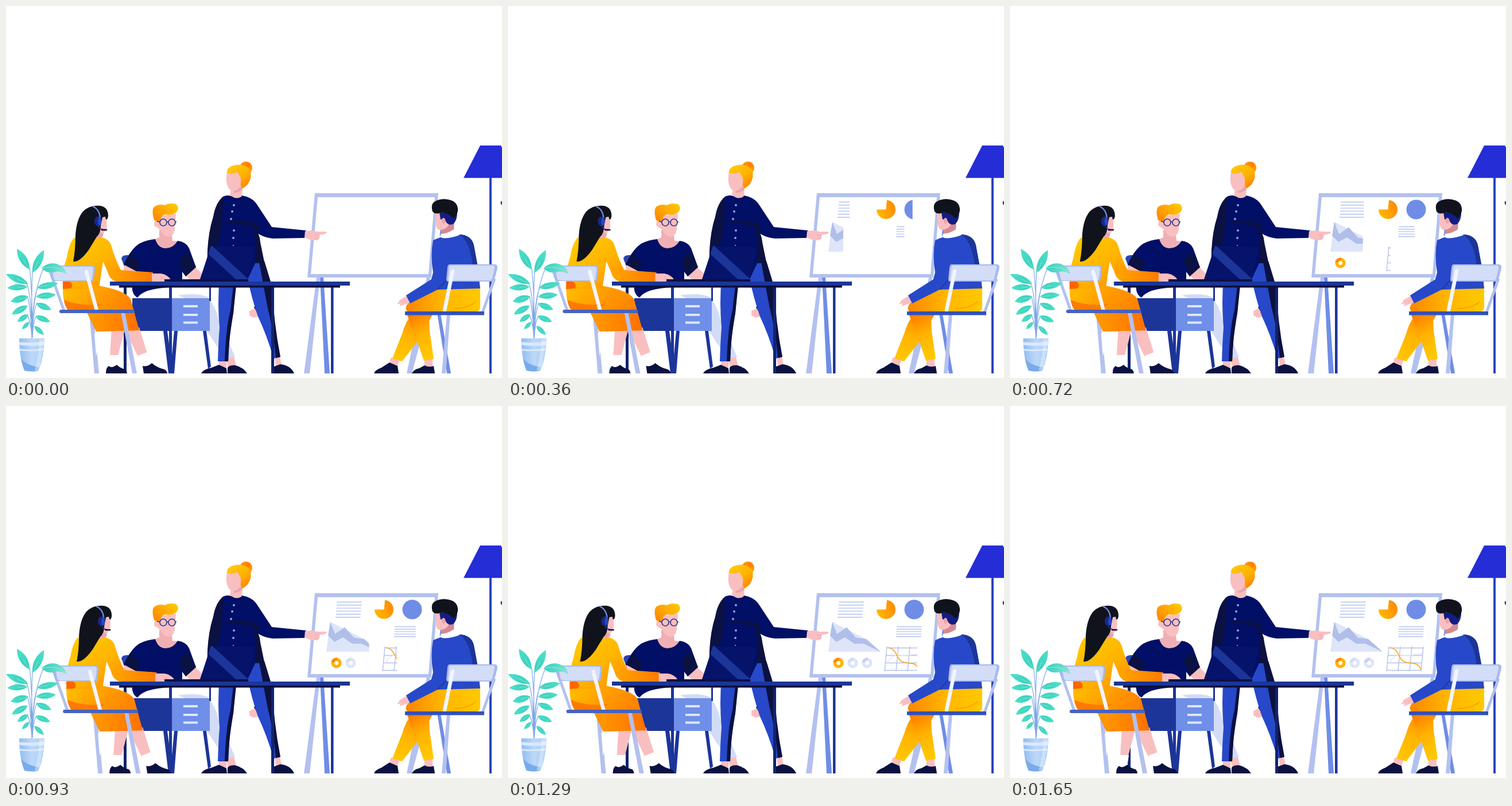
Write an HTML page with a canvas that moves like this. It is 864 px wide and 648 px high and loops after 1.8 s.

```html
<!DOCTYPE html>
<html lang="en">
<head>
<meta charset="utf-8">
<title>Meeting</title>
<style>
html, body { margin: 0; width: 100%; height: 100%; overflow: hidden; background: #fff; }
canvas { display: block; width: 864px; height: 648px; }
</style>
</head>
<body>
<canvas id="stage" width="864" height="648"></canvas>
<script>
const ctx = document.getElementById('stage').getContext('2d');
const LOOP = 1800, STEP = 30, LAST = 1650;
const NAVY = '#020f66', INK = '#0b1140', DEEP = '#1c3598', BLUE = '#2748c8', SKY = '#6f8de6';
const PALE = '#b3c1ef', MIST = '#dfe5f8', SKIN = '#f9bfc0', BLUSH = '#e8a5ac', HAIR = '#10131c';

function grad(x0, y0, x1, y1, ...cols) {
  const g = ctx.createLinearGradient(x0, y0, x1, y1);
  cols.forEach((c, i) => g.addColorStop(i / (cols.length - 1), c));
  return g;
}
function shape(d, fill) {
  ctx.fillStyle = fill;
  ctx.fill(new Path2D(d));
}
function line(d, stroke, w = 1.5, cap = 'butt') {
  ctx.strokeStyle = stroke;
  ctx.lineWidth = w;
  ctx.lineCap = cap;
  ctx.stroke(new Path2D(d));
}
function rect(x, y, w, h, fill) {
  ctx.fillStyle = fill;
  ctx.fillRect(x, y, w, h);
}
function oval(x, y, rx, ry, fill) {
  ctx.beginPath();
  ctx.ellipse(x, y, rx, ry, 0, 0, 7);
  ctx.fillStyle = fill;
  ctx.fill();
}
// Shows only what lies left of the moving edge.
function wipe(edge, draw) {
  ctx.save();
  ctx.beginPath();
  ctx.rect(0, 0, Math.max(0, edge), 648);
  ctx.clip();
  draw();
  ctx.restore();
}

function leaf(x0, y0, x1, y1, w) {
  const mx = (x0 + x1) / 2, my = (y0 + y1) / 2, len = Math.hypot(x1 - x0, y1 - y0);
  const nx = (y0 - y1) / len * w, ny = (x1 - x0) / len * w;
  shape(`M${x0} ${y0}Q${mx + nx} ${my + ny} ${x1} ${y1}Q${mx - nx} ${my - ny} ${x0} ${y0}`,
    grad(x0, y0, x1, y1, '#35cdbd', '#4fe0c8'));
  line(`M${x0} ${y0}L${mx} ${my}`, '#a9eee4', .7);
}
function plant() {
  const leaves = [
    [41, 459, 19, 423, 13], [46, 465, 66, 425, 13], [39, 484, 0, 467, 12], [38, 489, 2, 491, 11],
    [39, 506, 8, 515, 12], [38, 522, 10, 537, 11], [39, 537, 20, 550, 9], [41, 550, 28, 563, 7],
    [53, 491, 91, 483, 11], [52, 506, 87, 503, 11], [52, 518, 79, 529, 11],
    [51, 540, 77, 550, 10], [49, 557, 66, 573, 8]
  ];
  line('M45 580Q47 510 41 455M45 580Q44 510 46 462M45 580Q46 500 66 455M44 545Q43 500 36 483' +
    'M46 545Q49 505 55 491M44 560Q42 520 37 505M46 565Q49 525 54 517M45 575Q44 555 37 537M46 578Q47 550 53 540', '#7fa8e8', 1.2);
  leaves.forEach(l => leaf(...l));
  shape('M62 457Q72 446 88 449Q103 454 105 467Q93 460 83 464Q71 466 62 457', grad(62, 450, 105, 466, '#35cdbd', '#7fe6d5'));
  line('M62 457Q85 451 102 463', '#a9eee4', .8);
  const pot = 'M23 579H67Q66 612 57 635Q45 638 32 635Q23 612 23 579Z';
  shape(pot, grad(23, 0, 67, 0, '#8fbcf0', '#bcd8f8', '#a8cbf5'));
  ctx.save();
  ctx.clip(new Path2D(pot));
  shape('M20 585Q45 588 70 584V590Q45 594 20 590ZM20 597Q45 600 70 596V599Q45 603 20 600Z', '#d9e8fc');
  shape('M20 603Q28 625 57 629L55 640H20Z', '#79abea');
  shape('M58 580H67L58 635H50Q57 610 58 580Z', 'rgba(235,244,255,.45)');
  ctx.restore();
}

function lamp() {
  rect(842, 299, 4, 341, '#2a45bd');
  shape('M826 243H862L866 250V299.5H797Z', '#252dd6');
  oval(865, 343, 3.5, 3.5, '#2c3fb0');
}

function board() {
  shape('M541 473H547L529 640H519ZM733 473H739L707 640H698Z', PALE);
  shape('M547 473H553L564 640H555ZM741 473H746L775 640H768Z', SKY);
  line('M750 335Q762 380 757 400', SKY, 3.5);
  shape('M538 326H753L741 473H525Z', PALE);
  shape('M543 333H747L736 467H531Z', '#fff');
}
function textLines(x, y, w, gap, n, lean) {
  for (let i = 0; i < n; i++) {
    const l = x - lean * i / (n - 1);
    line(`M${l} ${y + gap * i}h${w}`, PALE, 1.4);
  }
}
function donut(x, base, part) {
  const y = 447.5;
  ctx.lineWidth = 5.6;
  ctx.lineCap = 'butt';
  [[0, 6.2832, base], [3.3, 4.9, part]].forEach(([a, b, c]) => {
    ctx.beginPath();
    ctx.arc(x, y, 6.3, a, b);
    ctx.strokeStyle = c;
    ctx.stroke();
  });
}
function charts(t) {
  wipe(574 + .0588 * t, () => textLines(576.5, 341.5, 43.5, 5.3, 6, 2.5));
  wipe(642 + .19 * (t - 30), () => {
    shape('M658.5 354.5L660 338A16.5 16.5 0 1 1 642 354.5Z', grad(642, 360, 675, 345, '#ffb900', '#ff8700'));
    oval(707.5, 354.5, 17, 17, SKY);
  });
  wipe(677 + .041 * (t - 35), () => textLines(677.5, 384.5, 43.5, 4.3, 5, 1.5));
  wipe(558 + .085 * (t - 54), () => {
    shape('M565 376L558 428H649L624 406Z', MIST);
    shape('M565 376L573 397L590 385.5L606 403.5L624 406L649 428L619 414H603L587 403L572 411L561 400Z', '#b0bfe9');
  });
  wipe(567 + .12 * (t - 545), () => {
    donut(575.5, '#ffb300', '#ff8a00');
    donut(600.5, MIST, '#d3dcf6');
    donut(625.5, MIST, '#c6d1f2');
  });
  wipe(655 + .088 * (t - 630), () => {
    for (let i = 0; i < 4; i++) {
      line(`M${660 + 20 * i} 419l-4 43`, PALE, 1.4);
      line(`M${659 - i} ${421.5 + 13 * i}h61`, PALE, 1.4);
    }
    line('M657 451C667 438 672 433 682 434S704 434 718 431', MIST, 1.4);
    line('M662 421C678 423 675 439 686 445S709 443 716 459', '#ffa91f', 1.7);
  });
}

function sitter() {
  shape('M201 440Q202 434 210 434H222V456H207Z', '#2a45b0');
  shape('M274 566H281L291 640H283ZM293 566H299L293 640H286ZM343 566H349L357 628L352 632Z', DEEP);
  shape('M300 504Q335 499 351 507Q364 521 370 545L399 611L383 616L350 566L335 520Z', '#d3dcf6');
  shape('M384 614L397 611L401 628L387 630Z', SKIN);
  shape('M386 640V630Q390 625 400 626Q414 630 420 640Z', INK);
  shape('M207 451L229 460L218 481H203Q202 465 207 451ZM313 470L331 456L345 470L340 477H322Z', SKIN);
  shape('M267 390H288L290 409L300 410Q288 425 273 424Q260 420 258 407L267 403Z', '#eeb0b5');
  shape('M265 366L296 362L294 389Q292 401 284 402Q275 402 269 390L258 382Q258 371 265 371Z', SKIN);
  shape('M258 373Q253 356 258 350Q266 344 277 347Q284 342 296 345Q303 351 297 359Q291 365 278 363Q270 364 269 373L265 376Z',
    grad(260, 372, 290, 345, '#ff8a00', '#ffc400'));
  line('M268 377a6 6 0 1 0 12 0a6 6 0 1 0 -12 0M283 377a6 6 0 1 0 12 0a6 6 0 1 0 -12 0M280 376h3M263 375l5 1M295 376h2', '#24358c', 1.6);
  shape('M260 406Q265 422 278 422Q291 422 299 409Q314 411 319 422L331 455L313 471L307 463V482H287L286 490Q240 492 229 508Q218 502 220 485L229 463L205 450Q217 424 232 414Q246 407 260 406Z', NAVY);
  shape('M205 450L217 431L234 449L229 463ZM302 443L317 428L331 455L313 471Z', INK);
}

function cabinet() {
  rect(220, 509, 70, 57, DEEP);
  rect(289, 509, 66, 57, '#6f8fe8');
  [521, 536, 549.5].forEach(y => rect(309, y, 25, 4, MIST));
  rect(354, 490, 3, 24, DEEP);
}

function speaker() {
  shape('M424 531L433 527L441 532L440 541L431 543L424 539Z', SKIN);
  shape('M432 525L437 518L442 530L438 534Z', INK);
  shape('M371 614H385L384 630H371ZM468 610L477 609L480 627L470 629Z', SKIN);
  shape('M340 640Q343 633 358 630L371 625L384 631L385 640ZM467 640V628L478 624Q496 626 502 640Z', INK);
  shape('M372 470H401L396 535L389 580L387 619H369Q370 585 372 560Q368 520 372 470Z', BLUE);
  shape('M401 487L396 535Q389 570 387 619H381Q383 560 391 530L396 487Z', INK);
  shape('M425 448H450L462 520L477 612L466 614Q455 575 439 541Q428 510 421 475Z', BLUE);
  shape('M441 446L450 444L464 490Q466 550 478 611L470 613Q465 560 456 527Q449 490 441 446Z', INK);
  // far sleeve, then the jacket
  shape('M378 332Q365 343 361 367Q353 391 351 425L350 480H418L428 448H450Q443 425 442 404L432 380L380 372Z', INK);
  shape('M378 332Q388 327 398 334L411 330Q428 333 436 344L463 385L523 391L520 404L465 405Q443 402 436 393L437 407L434 448L420 478H366L368 418L375 390L377 362Z', NAVY);
  shape('M384 374Q405 378 417 374L436 381L441 402L450 446H437L434 400L430 383Q405 379 384 378Z', INK);
  line('M429 364L440 390', INK, 1);
  [[397, 347], [394, 358], [392, 371], [397, 391], [396, 404]].forEach(([x, y]) => oval(x, y, 2, 2, '#8ba1e8'));
  oval(396, 417, 1.1, 1.1, '#8ba1e8');
  shape('M393 312L413 306L411 331Q406 336 398 334L390 329Z', SKIN);
  shape('M397 322L411 313V320Q405 326 396 325Z', BLUSH);
  oval(418, 282, 11, 11, grad(408, 272, 428, 292, '#ff9a00', '#ff7f00', '#ffae00'));
  shape('M385 294Q383 281 396 278Q414 273 425 285Q430 297 421 311L412 318L400 296Z',
    grad(395, 278, 420, 316, '#ffc800', '#ffb300', '#ff8200'));
  shape('M385 290Q393 295 403 289L409 300Q411 321 396 322Q388 322 385 311Q382 301 385 290Z', SKIN);
  line('M400 290Q393 287 397 291', BLUSH, 1);
  shape('M521 392L532 391L544 393L557 393Q561 395 556 397L546 399Q548 405 542 408H532L520 403Z', SKIN);
  line('M546 399H537M545 404H539', BLUSH, 1);
}

function laptop() {
  const lid = 'M357 418L434 420L420 479H337Z';
  shape(lid, '#06136a');
  ctx.save();
  ctx.clip(new Path2D(lid));
  line('M346 416L420 484', DEEP, 15);
  ctx.restore();
  rect(276, 476, 146, 4.5, INK);
}

function tableLegs() {
  rect(205, 488, 5, 152, '#12236f');
  rect(284, 488, 5, 152, DEEP);
  rect(462, 488, 5, 152, '#12236f');
  rect(566, 488, 4.5, 152, DEEP);
}
function tableTop() {
  rect(197, 486, 385, 4.5, '#0a1038');
  rect(181, 480, 418, 7, DEEP);
}

function caller() {
  // chair legs, shins and shoes
  shape('M145 534H152L162 640H154Z', PALE);
  shape('M184 560H208L195 609H181ZM205 560H232L246 605L230 611Z', SKIN);
  shape('M181 608H196L193 629H180ZM230 609L246 603L254 624L238 630Z', '#fff');
  shape('M174 640Q174 630 179 627Q184 632 193 625Q199 631 208 633Q211 636 211 640ZM240 640L238 627Q247 629 254 622Q263 630 276 633Q281 636 281 640Z', INK);
  shape('M100 480L160 487Q207 495 217 510L232 565L157 567L141 534L108 530Q96 512 100 480Z',
    grad(115, 485, 200, 565, '#ffbc00', '#ff9600', '#ff7a00'));
  shape('M101 512Q130 524 168 519Q154 526 160 531H109Q102 523 101 512Z', '#ff7a00');
  shape('M145 534L222 533L232 565L157 567Z', grad(150, 0, 230, 0, '#ff9800', '#ff7000'));
  shape('M118 404Q140 398 162 402Q178 404 183 416Q190 441 200 460L256 464V480L199 481Q181 480 177 463L169 445L162 492L99 494Q97 463 106 437Q109 416 118 404Z',
    grad(120, 405, 190, 490, '#ffc800', '#ffb600', '#ff8f00'));
  shape('M183 454Q189 462 200 462L256 464V480L199 481Q185 480 180 470Z', grad(183, 0, 256, 0, '#ffa300', '#ff7a00'));
  shape('M99 480H111Q119 486 113 492L99 493Z', '#ff6400');
  shape('M254 466L270 466Q280 468 286 475L285 480H254Z', SKIN);
  line('M270 473L282 478', BLUSH, 1);
  // head
  shape('M156 388H171L169 401Q163 407 153 404Z', BLUSH);
  shape('M163 362H173Q177 375 175 389L169 397L160 391Z', SKIN);
  shape('M178 366Q178 350 164 348Q146 346 134 358Q123 371 121 399Q121 425 117 445Q128 447 144 425L158 402Q165 396 165 383L168 368L173 367Q174 375 177 370Z', HAIR);
  line('M151 349Q165 355 164 375', SKY, 2.3);
  oval(160, 375, 6, 8.5, '#17288a');
  oval(163, 375, 3, 7.5, BLUE);
  line('M161 383Q163 390 175 390', '#24358c', 1.5);
  line('M167 390H175', INK, 2.5, 'round');
  // chair
  line('M75 457L101 531', PALE, 5);
  shape('M74 452H150Q156 453 155 458L153 477Q152 480 147 479H85Q80 479 79 475L73 455Z', '#a9b9ee');
  shape('M79 454H148Q152 454 152 458L150 475Q149 478 145 478H88Q84 478 83 474Z', '#d3ddf7');
  line('M140 463L158 530', '#f2f5fe', 6.5, 'round');
  shape('M200 533H207L228 640H220Z', PALE);
  shape('M154 570L162 567L161 590L157 610Z', '#fff');
  line('M96 532H221', '#4862bd', 6, 'round');
}

function listener() {
  shape('M728 536H735L707 640H699Z', PALE);
  shape('M768 536H774L766 640H759Z', PALE);
  shape('M670 612L685 617L681 631H666ZM729 612H743V631H729Z', SKIN);
  shape('M641 640Q643 634 654 630L668 621L682 627L684 640ZM707 640Q710 633 720 631L729 626Q736 630 745 627L747 640Z', INK);
  shape('M708 536L745 534Q733 555 720 580L690 619L673 614L690 571Q696 549 708 536Z',
    grad(715, 540, 680, 615, '#ff8a00', '#ffb600', '#ffc600'));
  shape('M698 536H737L738 566L745 615L728 618L714 577Z', grad(700, 540, 738, 610, '#ff7a00', '#ffb300', '#ffc800'));
  shape('M750 492L826 488V524Q826 532 819 532H699Q693 526 701 517Q721 502 750 492Z',
    grad(697, 0, 826, 0, '#ff8500', '#ffb600', '#ffc900'));
  line('M780 527Q805 527 818 515', '#ffa200', 2);
  shape('M698 505L686 512L681 520L687 518L686 523L700 518L706 516Z', SKIN);
  shape('M744 408Q762 399 790 398Q811 399 815 417L822 455L826 492L752 494L704 518L697 504L741 476L744 464Q739 433 744 408Z', BLUE);
  shape('M790 398Q811 399 815 417L822 455H813Q810 413 790 398Z', DEEP);
  line('M752 494L758 487Q770 478 771 455', DEEP, 1.3);
  // head
  shape('M757 376L781 375L780 392Q771 401 759 399Z', '#d48a95');
  shape('M747 357H767L771 382Q764 391 754 390Q748 386 748 374Z', SKIN);
  shape('M757 397Q771 396 780 389L790 399Q772 406 759 404Z', '#fff');
  shape('M755 360H786Q786 373 779 380Q770 383 766 375L764 370L757 372Z', '#131d83');
  oval(762, 374, 3, 5, '#eda3aa');
  shape('M743 358Q739 344 748 340Q762 333 777 339Q788 344 787 357Q785 366 779 370Q769 358 757 360Q748 364 743 358Z', HAIR);
  // chair
  line('M851 475L830 534', PALE, 5);
  shape('M773 450H852Q857 451 856 457L851 476Q850 480 845 480H771Q766 480 767 475L769 455Q770 450 773 450Z', '#a9b9ee');
  shape('M775 452H849Q852 453 851 457L847 474Q846 478 842 478H772Q769 478 770 474L772 456Q773 452 775 452Z', '#d3ddf7');
  line('M778 462L764 530', '#f2f5fe', 6.5, 'round');
  rect(695, 532, 138, 6.5, '#3450b8');
}

function render(t) {
  rect(0, 0, 864, 648, '#fff');
  lamp();
  board();
  charts(t);
  sitter();
  cabinet();
  speaker();
  tableLegs();
  ctx.save();
  ctx.translate(11 * t / LAST, 0);
  caller();
  ctx.restore();
  laptop();
  tableTop();
  listener();
  plant();
}

const start = performance.now();
function tick() {
  const t = (performance.now() - start) % LOOP;
  render(Math.min(LAST, Math.floor(t / STEP) * STEP));
  requestAnimationFrame(tick);
}
tick();
</script>
</body>
</html>
```
